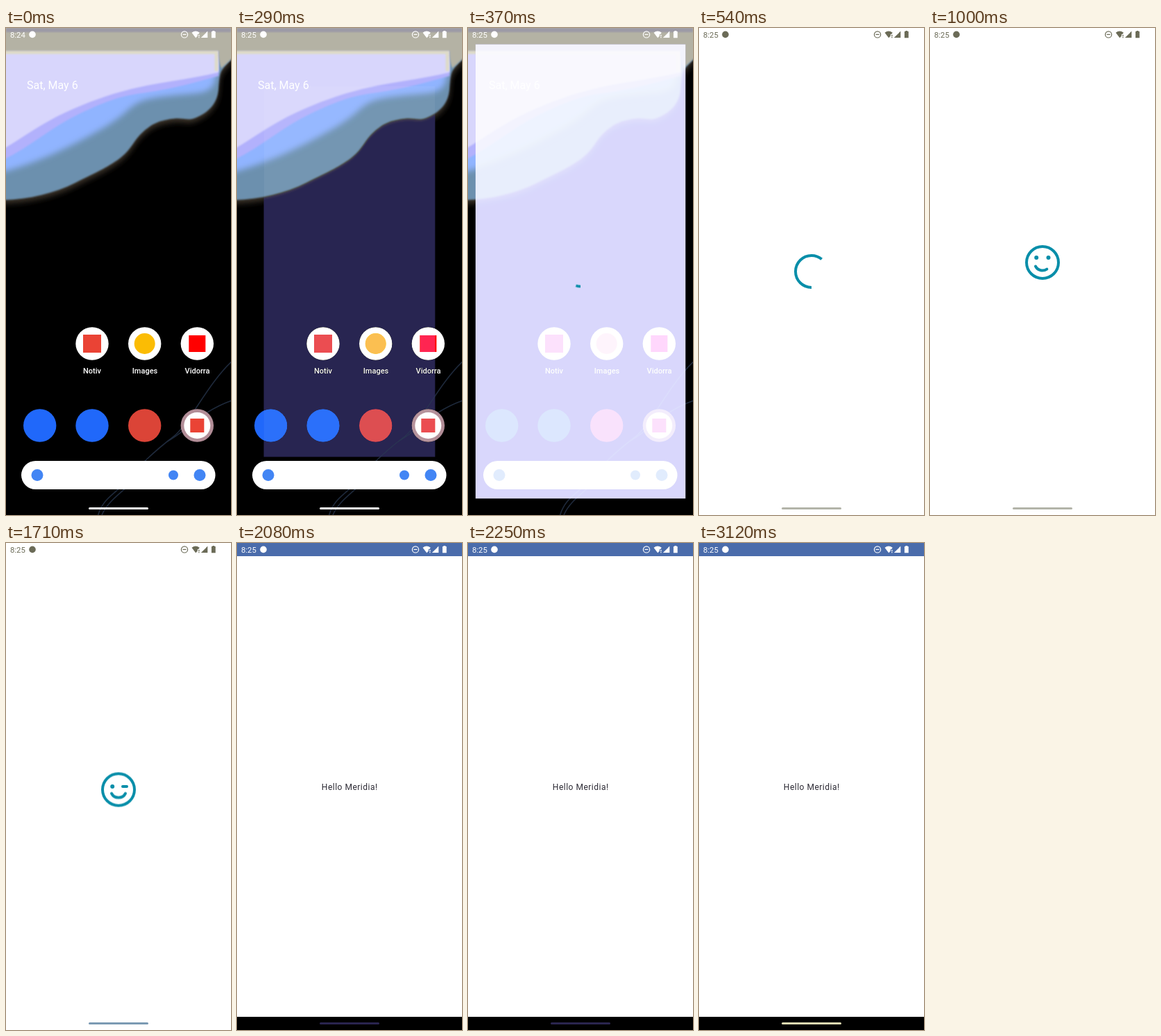
These frames come from a looping animation (324 px wide and 702 px high, 3.16 s). An HTML page:

```html
<!DOCTYPE html>
<html lang="en">
<head>
<meta charset="utf-8">
<title>App launch with splash screen</title>
<style>
html, body { margin: 0; width: 100%; height: 100%; overflow: hidden; background: #000; }
svg { display: block; width: 324px; height: 702px; font-family: Roboto, Arial, sans-serif; }
svg * { animation: 3160ms linear infinite; }

.label { font-size: 11px; font-weight: 500; fill: #fff; text-anchor: middle; }
.open { transform-origin: 162px 351px; }
.face { stroke: #088ea9; stroke-width: 4; fill: none; }
.dot { fill: #088ea9; stroke: none; }
.trim { stroke-dasharray: 1 2; }

/* clock */
#before { animation-name: before; }
#after { animation-name: after; }
@keyframes before { 0%, 1.26% { opacity: 1 } 1.27%, 100% { opacity: 0 } }
@keyframes after { 0%, 1.26% { opacity: 0 } 1.27%, 100% { opacity: 1 } }

/* window opening */
.open { animation-name: open; }
#white { animation-name: open, whiten; }
#tint { animation-name: open, tint; mix-blend-mode: lighten; }
@keyframes open {
  0%, 7.91% { transform: scale(.66) }
  9.18% { transform: scale(.76) }
  11.71% { transform: scale(.932); animation-timing-function: ease-out }
  15.19%, 100% { transform: scale(1) }
}
@keyframes whiten {
  0%, 7.91% { opacity: 0 }
  9.18% { opacity: .04 }
  11.71% { opacity: .84 }
  12.97%, 100% { opacity: 1 }
}
@keyframes tint {
  0%, 7.91% { fill: #000 }
  9.18% { fill: #26234f }
  11.71% { fill: #d8d6fc }
  12.97%, 100% { fill: #fff }
}

/* face */
#hop { animation-name: hop; }
#ring { animation-name: ring; }
#smile { animation-name: smile; stroke-linecap: round; }
#eyes { animation-name: eyes; }
#wink { animation-name: wink; }
@keyframes hop {
  0%, 24.68% { transform: translate(162px, 351px); animation-timing-function: ease-in-out }
  31.65% { transform: translate(162px, 338px); animation-timing-function: ease-in-out }
  42.72%, 100% { transform: translate(162px, 355.5px) }
}
@keyframes ring {
  0%, 11.08% { stroke-dashoffset: 1 }
  11.71% { stroke-dashoffset: .95; animation-timing-function: ease-in-out }
  21.5%, 100% { stroke-dashoffset: 0 }
}
@keyframes smile {
  0%, 24.67% { stroke-dashoffset: 1; opacity: 0 }
  24.68% { stroke-dashoffset: 1; opacity: 1 }
  31.65% { stroke-dashoffset: .23; opacity: 1 }
  34.18%, 100% { stroke-dashoffset: 0; opacity: 1 }
}
@keyframes eyes {
  0%, 21.5% { transform: translateY(0); opacity: 0 }
  24.05%, 42.72% { transform: translateY(0); opacity: 1 }
  47.47%, 100% { transform: translateY(2.5px); opacity: 1 }
}
@keyframes wink {
  0%, 47.47% { x: 5.5px; y: -10px; width: 6px; height: 6px; rx: 3px }
  51.27%, 100% { x: 4px; y: -9px; width: 10px; height: 4px; rx: 2px }
}

/* app and system bars */
#app { animation-name: app; }
#status { animation-name: status; }
#handle { animation-name: handle; }
@keyframes app { 0%, 62.03% { opacity: 0 } 65.19%, 100% { opacity: 1 } }
@keyframes status {
  0%, 12.97% { color: #fff }
  15.19%, 62.03% { color: #6b6b57 }
  65.19%, 100% { color: #fff }
}
@keyframes handle {
  0%, 9.18% { fill: #fff }
  11.71%, 12.97% { fill: #fff0 }
  15.19%, 52.52% { fill: #b3b4a9 }
  52.53%, 62.03% { fill: #7b9ab3 }
  65.19%, 71.2% { fill: #29244f }
  79.1%, 100% { fill: #dcd8b0 }
}
</style>
</head>
<body>
<svg viewBox="0 0 324 702">
  <defs>
    <filter id="soft" x="-10%" y="-10%" width="120%" height="120%"><feGaussianBlur stdDeviation="1.2"/></filter>
    <filter id="haze" x="-10%" y="-10%" width="120%" height="120%"><feGaussianBlur stdDeviation="4"/></filter>
    <path id="hill" d="M-10 248C30 248 68 239 100 223S150 199 166 186S184 161 198 149S220 134 238 131S260 135 274 129S304 112 306 88S306 64 324 46V-10H-10Z"/>
  </defs>

  <rect width="324" height="702"/>

  <!-- wallpaper -->
  <use href="#hill" y="5" fill="#3c362c" filter="url(#haze)"/>
  <use href="#hill" fill="#6c90ae" filter="url(#soft)"/>
  <path filter="url(#haze)" fill="#90b4ff" d="M-10 209C45 195 95 170 135 147S172 118 190 108S250 97 275 94S301 80 303 62V20H-10Z"/>
  <path filter="url(#soft)" fill="#b2b1fc" d="M-10 193C30 175 65 143 105 124S165 98 195 94S255 84 306 69V20H-10Z"/>
  <path filter="url(#soft)" fill="#d8d6fc" d="M-10 178C25 158 50 138 85 122S145 97 180 88S260 75 306 64V20H-10Z"/>
  <path filter="url(#soft)" fill="none" stroke="#dedcc8" stroke-width="5" d="M-10 35H303V62"/>
  <path filter="url(#soft)" fill="#b4b2a4" d="M-10 -10H334V36L310 58Q306 48 306 33H-10Z"/>
  <rect width="324" height="6" fill="#9c9aa6" filter="url(#soft)"/>
  <g fill="none" stroke="#26344a" stroke-width="1.6" opacity=".8">
    <path d="M132 704C140 676 158 672 172 654S216 608 240 590S290 512 328 478"/>
    <path d="M138 702C150 674 184 662 200 630M232 596C262 580 280 552 328 536"/>
  </g>

  <!-- home screen -->
  <text x="30" y="88" font-size="16" fill="#fff">Sat, May 6</text>
  <g fill="#fff">
    <circle cx="124" cy="455" r="23.7"/>
    <circle cx="199.7" cy="455" r="23.7"/>
    <circle cx="275.3" cy="455" r="23.7"/>
    <rect x="22" y="624" width="279.5" height="41" rx="20.5"/>
  </g>
  <rect x="111" y="442" width="26" height="26" fill="#ea4335"/>
  <circle cx="199.7" cy="455" r="15" fill="#fbbc04"/>
  <rect x="263.3" y="443" width="24" height="24" fill="#f00"/>
  <text class="label" x="124" y="498">Notiv</text>
  <text class="label" x="200" y="498">Images</text>
  <text class="label" x="275.5" y="498">Vidorra</text>
  <circle cx="48.7" cy="573" r="23.7" fill="#2068fa"/>
  <circle cx="124" cy="573" r="23.7" fill="#2068fa"/>
  <circle cx="199.7" cy="573" r="23.7" fill="#db4437"/>
  <circle cx="275.3" cy="573" r="23.7" fill="#b28d97"/>
  <circle cx="275.3" cy="573" r="19" fill="#fff"/>
  <rect x="265.3" y="563" width="20" height="20" fill="#ea4335"/>
  <circle cx="45" cy="644.5" r="8.5" fill="#4285f4"/>
  <circle cx="241" cy="644.5" r="7" fill="#4285f4"/>
  <circle cx="279" cy="644.5" r="8.5" fill="#4285f4"/>

  <!-- splash -->
  <rect id="white" class="open" width="324" height="702" fill="#fff"/>
  <rect id="tint" class="open" width="324" height="702"/>
  <g class="open">
    <g id="hop" class="face">
      <path id="ring" class="trim" pathLength="1" d="M0 23A23 23 0 0 1 0 -23A23 23 0 0 1 0 23"/>
      <path id="smile" class="trim" pathLength="1" d="M-10 5.5C-6 13.5 6 13.5 10 5.5"/>
      <g id="eyes" class="dot">
        <circle cx="-8.8" cy="-7" r="3"/>
        <rect id="wink"/>
      </g>
    </g>
  </g>

  <!-- app -->
  <g id="app">
    <rect width="324" height="702" fill="#fff"/>
    <rect width="324" height="19" fill="#4a6cab"/>
    <rect y="683" width="324" height="19"/>
    <text x="162.2" y="356" font-size="12" letter-spacing=".5" text-anchor="middle" fill="#2b2933">Hello Meridia!</text>
  </g>

  <!-- system bars -->
  <g id="status" fill="currentColor">
    <g font-size="11.3">
      <text id="before" x="6" y="14">8:24</text>
      <text id="after" x="6" y="14">8:25</text>
    </g>
    <circle cx="38" cy="9.4" r="4.8"/>
    <path d="M254.5 9.4H259.5M261.6 9.4a4.6 4.6 0 1 1 -9.2 0a4.6 4.6 0 1 1 9.2 0" fill="none" stroke="currentColor" stroke-width="1.2"/>
    <path d="M267.5 6.8Q273 2.4 278.8 6.8L277 9H275.8V11.6L273.2 14.3ZM277.2 9.8h1.3v2.4h-1.3zM277.2 13h1.3v1.3h-1.3z"/>
    <path d="M290.3 4.6V14H280.8Z"/>
    <path d="M297.3 4H300.3V5H301.7V14.3H295.9V5H297.3Z"/>
  </g>
  <rect id="handle" x="119" y="691" width="86" height="3" rx="1.5"/>
</svg>
</body>
</html>
```
